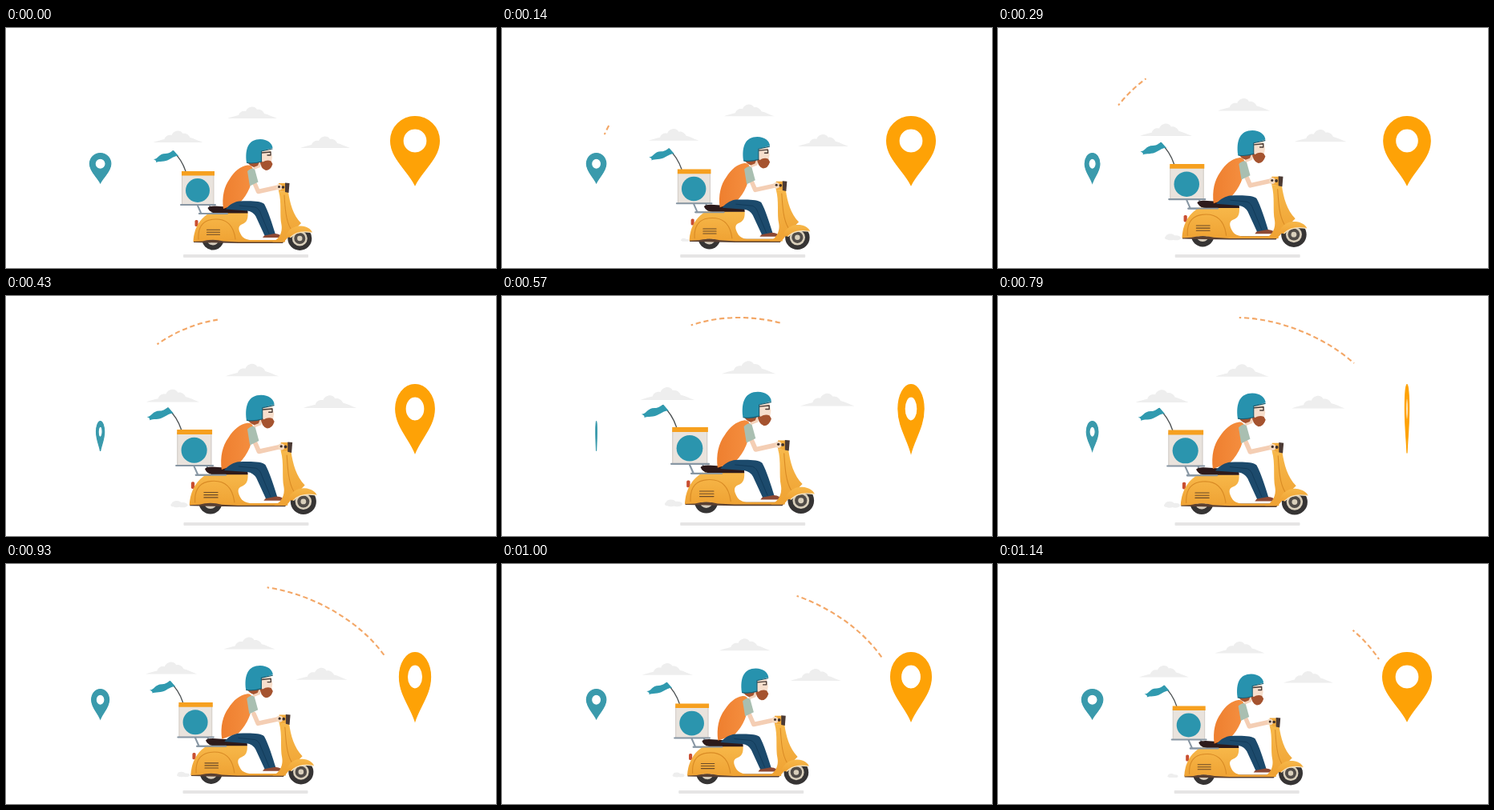
An HTML page for the animation above (1210 ms loop, 611 by 300 pixels).

```html
<!DOCTYPE html>
<html lang="en">
<head>
<meta charset="utf-8">
<title>Scooter delivery</title>
<style>
  html, body { margin: 0; width: 100%; height: 100%; overflow: hidden; background: #fff; }
  svg { display: block; width: 611px; height: 300px; }
  .line { fill: none; stroke-linecap: round; stroke-linejoin: round; }
  #pin { stroke-width: 1.2px; vector-effect: non-scaling-stroke; }
  #start { fill: #3a9aac; stroke: #3a9aac; }
  #goal { fill: #fea206; stroke: #fea206; }
</style>
</head>
<body>
<svg viewBox="0 0 611 300">
  <defs>
    <path id="pin" fill-rule="evenodd" d="M0 55.4C-9 37-30.4 22-30.4 0A30.4 30.4 0 1 1 30.4 0C30.4 22 9 37 0 55.4ZM0-15A15 15 0 1 0 0 15A15 15 0 1 0 0-15Z"/>
    <path id="cloud" fill="#eee" d="M-31 15C-26 13-21 12-17 11C-16 7-12 5-8 6C-6 0 3-2 6 4C10 3 14 6 15 9C20 10 25 13 31 15Z"/>
    <linearGradient id="paint" x2="0" y2="1">
      <stop offset="0" stop-color="#f7b84a"/>
      <stop offset="1" stop-color="#efa233"/>
    </linearGradient>
    <linearGradient id="vest" x2="1">
      <stop offset="0" stop-color="#ee7f2f"/>
      <stop offset="1" stop-color="#f58f40"/>
    </linearGradient>
  </defs>

  <path id="route" class="line" stroke="#f3a767" stroke-width="2.1" style="stroke-linecap:butt" d="M127 135C147 87 205 27 296 27C365 27 440 66 475 119"/>
  <use id="start" href="#pin"/>
  <use id="goal" href="#pin"/>
  <rect id="shadow" x="221" y="283" width="156" height="4" rx="1" fill="#e6e5e5"/>
  <g id="smoke" fill="#eee">
    <ellipse cx="-3" cy="0" rx="6" ry="4"/>
    <ellipse cx="4" cy="1" rx="6" ry="3"/>
    <ellipse cx="-7" cy="1" rx="3" ry="2"/>
  </g>

  <g id="scene">
    <use class="cloud" href="#cloud"/>
    <use class="cloud" href="#cloud"/>
    <use class="cloud" href="#cloud"/>

    <!-- flag and box -->
    <path class="line" stroke="#4d5254" stroke-width="1.3" d="M224 179Q219 164 208 154"/>
    <path fill="#309aaf" d="M184 164C190 164 190 157 199 157C204 157 206 154 209 153L215 160C210 160 208 162 204 164C198 168 191 166 187 168C188 166 186 165 184 164Z"/>
    <path fill="#e9e3dd" stroke="#c9c2bc" stroke-width=".8" d="M219.5 182H259V221H219.5Z"/>
    <path fill="#f6a01f" d="M219 179H260V184.5H219Z"/>
    <circle cx="239" cy="203" r="15" fill="#2b95ae"/>
    <path class="line" stroke="#8796a3" stroke-width="2" d="M218 221H261M239 222L243 231M254 222L257 230M241 232H254"/>

    <!-- wheels -->
    <circle cx="258" cy="264" r="13.5" fill="#363434"/>
    <circle cx="258" cy="264" r="7.5" fill="#d5cbbb"/>
    <circle cx="258" cy="264" r="4" fill="#55504c"/>
    <circle cx="366.3" cy="263" r="15" fill="#363434"/>
    <circle cx="366.3" cy="263" r="9.5" fill="#d9cfbb"/>
    <circle cx="366.3" cy="263" r="7" fill="#514c48"/>
    <circle cx="366.3" cy="263" r="3.2" fill="#d9cfbb"/>

    <!-- body -->
    <path fill="#5a4032" d="M234 265H348L345 269H290L234 268Z"/>
    <rect x="235.5" y="240" width="4" height="8" rx="1.5" fill="#c94f31"/>
    <path fill="url(#paint)" d="M233.5 267C234 252 241 238 254 231H301.5C302 239 300 243 295 245C289 247 289 252 294 260Q297 264 304 265H348V267.5H290L271 266.5Q258 263 245 266.5Z"/>
    <path class="line" stroke="#d98b25" stroke-width="1.1" d="M240 264C239 247 247 239 262 239C277 239 284 248 286 264"/>
    <path class="line" stroke="#6b4a28" stroke-width="1.1" d="M250.5 252.3H266.5M250.5 255.3H266.5M250.5 258.3H266.5"/>
    <path fill="#2d1a1b" d="M251.5 225Q253 222.5 260 222.5L298 225Q302 226 301.5 231.5H262Q254 231 251.5 225Z"/>
    <path class="line" stroke="#8796a3" stroke-width="1.8" d="M241 232H276"/>

    <!-- rider -->
    <path id="torso" fill="url(#vest)" d="M301 171.5Q307 171 308 177C308 194 302 208 291 219L271 226C269 211 272 198 279 188.5C285 179 292 173 301 171.5Z"/>
    <path fill="#1c4a6c" d="M274 226.5C279 220 286 217 291 216.5C305 216 318 216 322 220C327 229 332 245 336 258L323 260.5L311.5 235.5Q308 229.5 301 228.5Z"/>
    <path class="line" stroke="#123a58" stroke-width=".9" d="M291 222L311 224Q316 226 318 233L328 257"/>
    <path fill="#8d4934" d="M322 259.5L335 257Q343 257.5 344 262H320Z"/>

    <!-- front -->
    <path fill="url(#paint)" d="M340 204L352 205C354 219 358 234 368 244L363 249C354 253 353 264 345 267.5H332C341 264 345 255 343.5 246C341 234 344 218 340 204Z"/>
    <path class="line" stroke="#d98b25" stroke-width="1" d="M347 209C348 225 349 241 355 251"/>
    <path fill="url(#paint)" d="M348 261C352 251 360 247 368 247.5C375 248 380 251 382 255.5C372 254 361 255 355 262Z"/>
    <path class="line" stroke="#f8e6c4" stroke-width="1.2" d="M355 261.5C361 255 371 254 381 255.5"/>
    <path fill="#f2ab3c" d="M340 194H349V205L340 204Z"/>
    <path fill="#4b3a34" d="M348 193.5L353.5 194L352.5 206L348 205Z"/>
    <path class="line" stroke="#f4ceb4" stroke-width="5.4" d="M309.5 193L314.5 204.5L337 199.5"/>
    <circle cx="340.5" cy="199" r="3.8" fill="#f4d9bf"/>
    <circle cx="340.5" cy="198.5" r="1.5" fill="#3f302b"/>
    <circle cx="345.5" cy="199" r="1.8" fill="#3f302b"/>

    <g id="head">
      <path fill="#a9bfb1" d="M301 179Q306 174 310 176L314.5 192.5L304 197.5Z"/>
      <path fill="#f4d3bb" d="M307 165H319L317 174L309 177Z"/>
      <path fill="#a5532f" d="M301 167H316L314 172L309 174Q303 172 301 167Z"/>
      <path fill="#f7dfcd" d="M316 152H330L332 161L331 167H317Z"/>
      <path fill="#a5532f" d="M316.5 164L320 167.5Q326 164 330.5 166.5L332.5 170Q330 178 324 178Q317 176 316.5 164Z"/>
      <path class="line" stroke="#493b36" stroke-width="1.3" d="M319 156L330 155V159H326"/>
      <path fill="#2792ae" d="M300 168.5C297.5 150 303 139 317 139C326 139 332 144 332.5 150L318.5 154V167Q309 170 300 168.5Z"/>
      <path class="line" stroke="#1b5d72" stroke-width="1.1" d="M332 151L318.5 154V167Q309 170 300.5 168.5"/>
    </g>
  </g>
</svg>
<script>
const LOOP = 1210, STEPS = 17;
const $ = id => document.getElementById(id);

// step, scale, cx, cy, head lift, cloud drift, goal turn, route from, route to, smoke x, smoke width
const poses = [
  [0, 1, 308, 209, 0, 0, 0, 0, 0, 230, 0],
  [2, 1.015, 309.2, 207, 0, 0, 0, 2, 15, 228, 10],
  [4, 1.05, 307.7, 201.5, 0, 0, 16, 45, 93, 218, 20],
  [8, 1.09, 309.2, 196.8, -.8, -1, 58, 151, 267, 214, 22],
  [11, 1.07, 307.5, 199.7, -3, -3, 95, 217, 374, 217, 20],
  [13, 1.035, 307.5, 204, -4.5, -5, 130, 242, 417, 221, 16],
  [16, 1, 306.7, 207.5, 0, -7, 180, 372, 421, 218, 13]
];
// x, y, drift factor
const clouds = [[214.5, 128, .9], [307, 98, .6], [398, 135, 1.4]];
const cloudEls = document.querySelectorAll('.cloud');

const put = (el, x, y, sx = 1, sy = sx) =>
  el.setAttribute('transform', `translate(${x} ${y}) scale(${sx} ${sy})`);

function poseAt(step) {
  let i = 0;
  while (i < poses.length - 2 && poses[i + 1][0] <= step) i++;
  const from = poses[i], to = poses[i + 1];
  const u = (step - from[0]) / (to[0] - from[0]);
  return from.map((v, j) => v + (to[j] - v) * u);
}

// The dash pattern travels with the trimmed end and opens with a short dot.
function dashes(from, to) {
  const on = 6.2, period = 10, list = [0];
  let end = 0;
  for (let p = from - 3.7; p < to; p += period) {
    const a = Math.max(p, from), b = Math.min(p + on, to);
    if (b <= a) continue;
    list.pop();
    list.push(...(end ? [a - end] : [0, a]), b - a, 0);
    end = b;
  }
  list[list.length - 1] = 999;
  return list.length > 1 ? list.join(' ') : '0 999';
}

const turn = deg => Math.max(.06, Math.abs(Math.cos(deg * Math.PI / 180)));

function draw(step) {
  const [, s, cx, cy, lift, drift, angle, from, to, smokeX, smokeW] = poseAt(step);
  $('scene').setAttribute('transform', `translate(${cx} ${cy}) scale(${s}) translate(-308 -209)`);
  put($('head'), 0, lift);
  put($('torso'), 0, lift * .6);
  clouds.forEach(([x, y, f], i) => put(cloudEls[i], x + drift * f, y + 52 * (s - 1)));
  put($('shadow'), cx - 308, 0);
  put($('smoke'), smokeX, cy + 57 * s, smokeW / 20);
  put($('start'), 117.6, 169.7, .435 * turn(step * 11.25), .435);
  put($('goal'), 510, 141, turn(angle), 1);
  $('route').setAttribute('stroke-dasharray', dashes(from, to));
}

function tick(now) {
  const t = now % LOOP;
  draw(Math.floor((t + 3) * STEPS / LOOP) % STEPS);
  requestAnimationFrame(tick);
}
draw(0);
requestAnimationFrame(tick);
</script>
</body>
</html>
```
